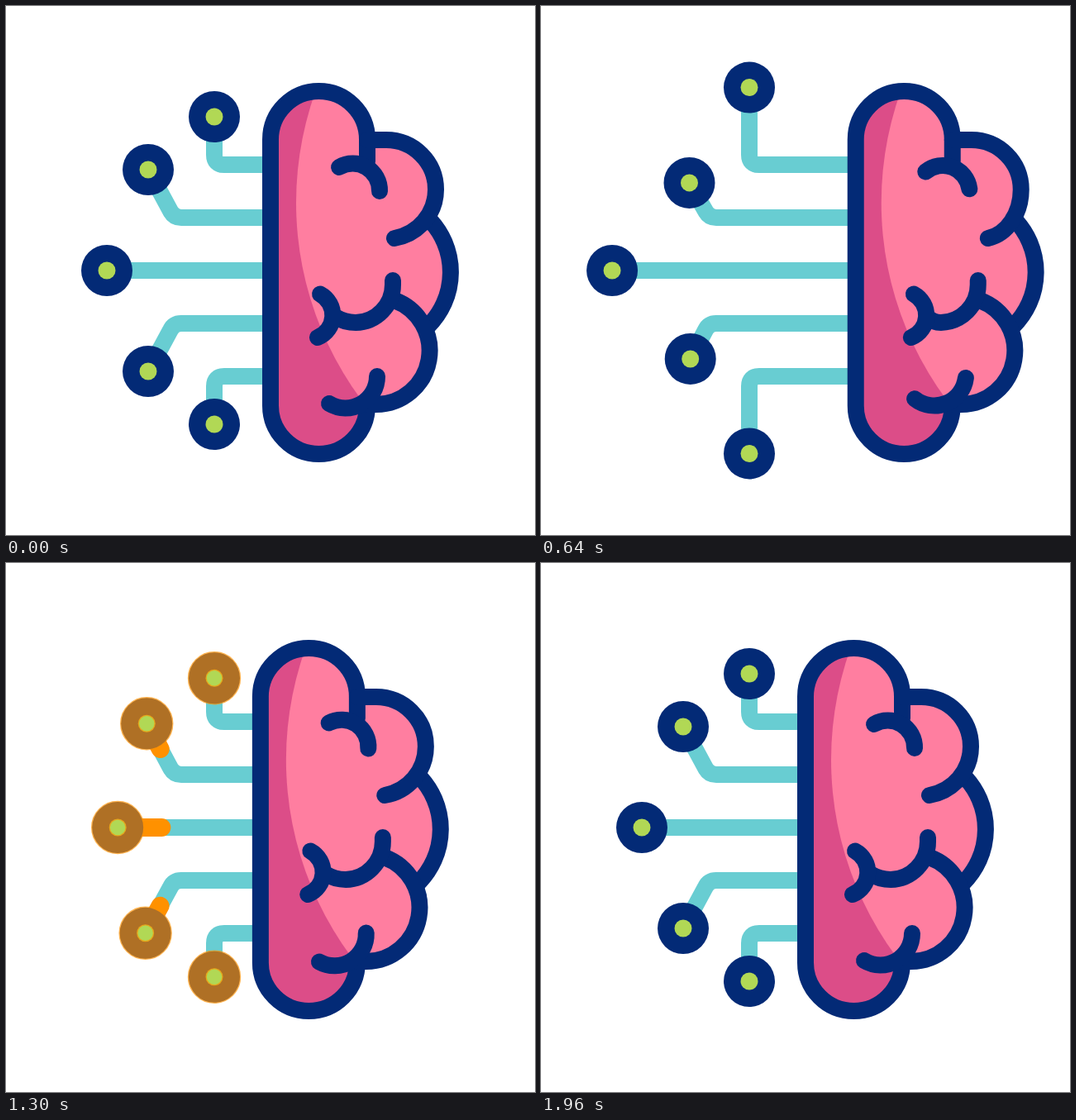
An HTML page for the animation above (2.1 s loop, 640 by 640 pixels).

```html
<!DOCTYPE html>
<html lang="en">
<head>
<meta charset="utf-8">
<title>Brain circuit</title>
<style>
  html, body { margin: 0; width: 100%; height: 100%; overflow: hidden; background: #fff; }
  svg { display: block; width: 100vw; height: 100vh; }
  .stroke { fill: none; stroke: #032a76; stroke-width: 20; stroke-linecap: round; stroke-linejoin: round; }
  .wire { fill: none; stroke: #68cdd2; stroke-width: 20; }
  .pulse { fill: none; stroke: #ff9100; stroke-width: 22; stroke-linecap: round; }
  .ring { fill: none; stroke: #ff9100; stroke-width: 23; }
</style>
</head>
<body>
<svg viewBox="0 0 640 640">
  <defs>
    <clipPath id="body">
      <path d="M320 161.5A58.5 58.5 0 0 1 437 161.5H460A60 60 0 0 1 510 256A92 92 0 0 1 510 388A65 65 0 0 1 448 482H437A58.5 58.5 0 0 1 320 483.5Z"/>
    </clipPath>
  </defs>
  <g id="wires"></g>
  <g id="pulses"></g>
  <g id="nodes"></g>
  <g id="brain">
    <g clip-path="url(#body)">
      <rect x="310" y="93" width="127" height="459" fill="#dc4d88"/>
      <circle cx="751" cy="238" r="400" fill="#ff7ea0"/>
    </g>
    <g class="stroke">
      <path d="M437 188V161.5A58.5 58.5 0 0 0 320 161.5V483.5A58.5 58.5 0 0 0 437 483.5"/>
      <path d="M511 257A92 92 0 0 1 510 388"/>
      <path d="M470 356A65 65 0 0 1 448 482H437"/>
      <path id="lobe"/>
      <path id="fold"/>
      <path id="curl"/>
      <path id="upper" d="M403 195A32.5 32.5 0 0 1 452 224"/>
      <path id="lower" d="M391 481A38.3 38.3 0 0 0 449 448"/>
    </g>
  </g>
</svg>
<script>
const LOOP = 2100, STEP = 20;
const KEYS = [200, 800, 1180, 1520, 1960];
const SETTLE = [.33, 0, .4, 1], SWING = [.33, 0, .67, 1];
const EASES = [SETTLE, SWING, SWING, SETTLE];

const $ = id => document.getElementById(id);
const clamp = x => Math.min(1, Math.max(0, x));
const cubic = (s, a, b) => 3 * s * (1 - s) ** 2 * a + 3 * s * s * (1 - s) * b + s ** 3;

function bezier([x1, y1, x2, y2], x) {
  let lo = 0, hi = 1;
  for (let i = 0; i < 24; i++) {
    const mid = (lo + hi) / 2;
    if (cubic(mid, x1, x2) < x) lo = mid; else hi = mid;
  }
  return cubic(lo, y1, y2);
}

function ramp(t, from, to) {
  const u = clamp((t - from) / (to - from));
  return u * u * (3 - 2 * u);
}

// Value at time t of a track that rests at 0 and passes three extremes.
function track(t, extremes, firstEase = SETTLE) {
  if (t <= KEYS[0] || t >= KEYS[4]) return 0;
  const values = [0, ...extremes, 0];
  const i = KEYS.findIndex(k => k > t) - 1;
  const u = (t - KEYS[i]) / (KEYS[i + 1] - KEYS[i]);
  const eased = bezier(i ? EASES[i] : firstEase, u);
  return values[i] + (values[i + 1] - values[i]) * eased;
}

const bent = (x, y, dir) =>
  `M400 ${320 - 128 * dir}H264Q252 ${320 - 128 * dir} 252 ${320 - 140 * dir}L${x} ${y}`;
const slanted = (x, y, dir) =>
  `M400 ${320 - 64 * dir}H212Q203 ${320 - 64 * dir} 199 ${320 - 72 * dir}L${x} ${y}`;
const straight = (x, y) => `M400 320L${x} ${y}`;

const OUTER = [-38.5, 12.3, -12.3];
const links = [
  { x: 252, y: 134, dx: 0, dy: 1, move: OUTER, dir: 1, path: bent, reach: 376 },
  { x: 172, y: 198, dx: .47, dy: 1, move: [17.3, -10.2, 12.3], dir: 1, path: slanted, reach: 376 },
  { x: 122, y: 320, dx: 1, dy: 0, move: [-39, 23.7, -13], dir: 0, path: straight, reach: 346 },
  { x: 172, y: 442, dx: .58, dy: -1, move: [16.3, -12, 9.7], dir: -1, path: slanted, reach: 376 },
  { x: 252, y: 506, dx: 0, dy: -1, move: OUTER, dir: -1, path: bent, reach: 376 }
];

function add(parent, tag, attrs) {
  const el = document.createElementNS("http://www.w3.org/2000/svg", tag);
  for (const name in attrs) el.setAttribute(name, attrs[name]);
  return parent.appendChild(el);
}

for (const link of links) {
  link.wire = add($("wires"), "path", { class: "wire" });
  link.pulse = add($("pulses"), "path", { class: "pulse" });
  link.node = add($("nodes"), "g", {});
  add(link.node, "circle", { r: 31, fill: "#032a76" });
  add(link.node, "circle", { r: 10.5, fill: "#b1d855" });
  link.ring = add(link.node, "circle", { r: 20.7, class: "ring" });
}

function drawLink(link, t) {
  const shift = track(t, link.move);
  const x = link.x + link.dx * shift, y = link.y + link.dy * shift;
  const d = link.path(x, y, link.dir);
  const head = link.reach * ramp(t, 900, 1300);
  const tail = link.reach * ramp(t, 1070, 1470);
  link.wire.setAttribute("d", d);
  link.pulse.setAttribute("d", d);
  link.pulse.setAttribute("stroke-dasharray", `0 ${tail} ${head - tail} 2000`);
  link.pulse.setAttribute("visibility", head - tail > .5 ? "visible" : "hidden");
  link.node.setAttribute("transform", `translate(${x} ${y})`);
  link.ring.setAttribute("opacity", ramp(t, 1200, 1360) * (1 - ramp(t, 1600, 1800)));
}

function drawBrain(t) {
  const slide = track(t, [64.3, -22, 12.4], [.33, .317, .4, 1]);
  const twist = track(t, [-10, 7.5, -10]);
  const tuck = track(t, [11, -3.7, 10.7]);
  const trim = Math.max(0, tuck);
  $("brain").setAttribute("transform", `translate(${slide} 0)`);
  $("upper").setAttribute("transform", `rotate(${twist} 438 188)`);
  $("lower").setAttribute("transform", `rotate(${-.8 * twist} 436 481)`);
  $("lobe").setAttribute("d",
    `M437 162H460A60 60 0 0 1 520 222C520 251 ${499 + trim * .4} 276 ${470 + trim} 281`);
  $("fold").setAttribute("d",
    `M468 332V337A46 46 0 0 1 423 383Q${410 + tuck * .4} 383 ${398 + tuck * .8} 376`);
  $("curl").setAttribute("d", `M${380 + tuck} 348.5A29 29 0 0 1 ${377 + tuck} 401`);
}

function draw(t) {
  links.forEach(link => drawLink(link, t));
  drawBrain(t);
}

const start = performance.now();
function tick() {
  const t = (performance.now() - start) % LOOP;
  draw(Math.floor(t / STEP) * STEP);
  requestAnimationFrame(tick);
}
draw(0);
requestAnimationFrame(tick);
</script>
</body>
</html>
```
